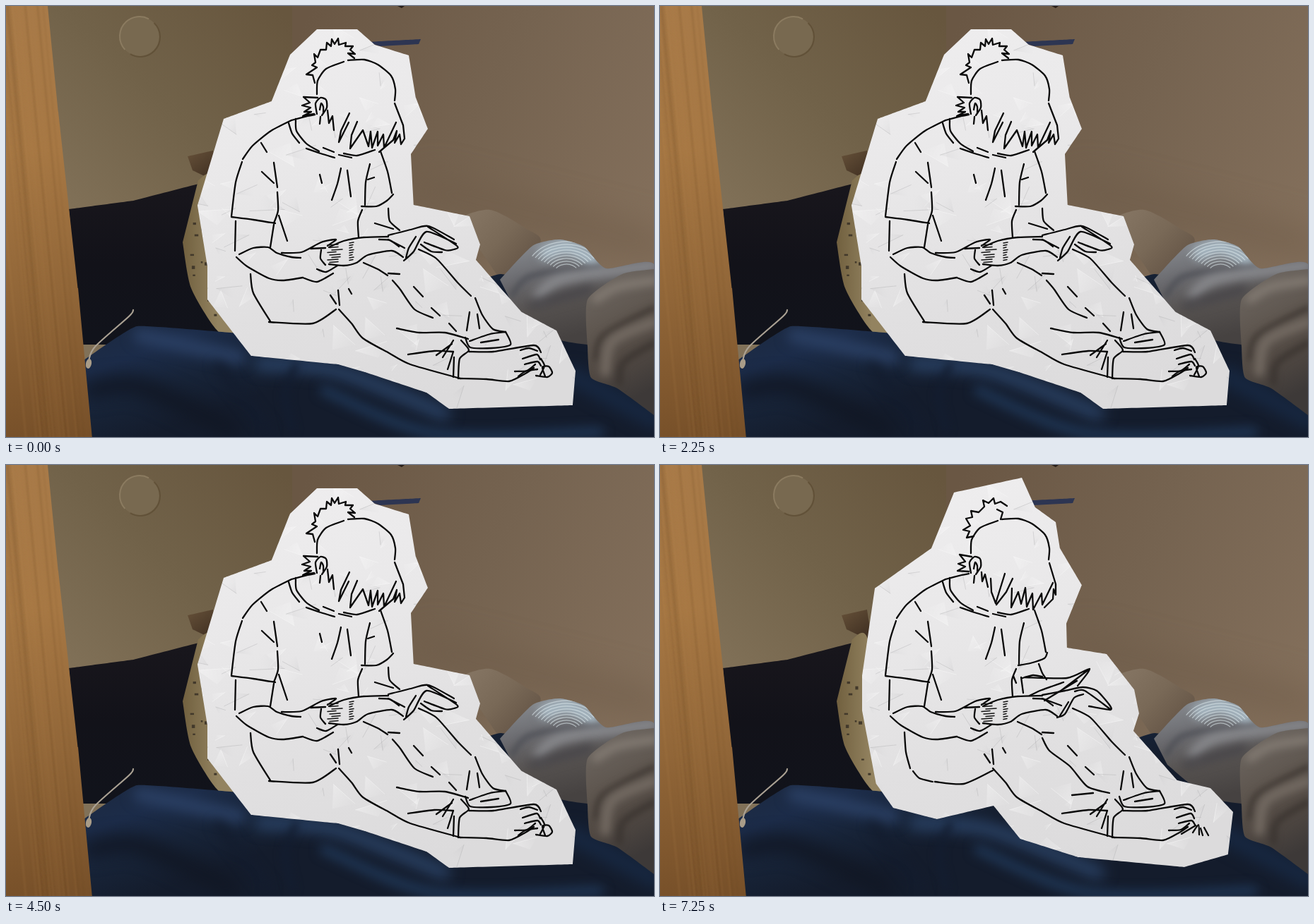
Animation, 917 px wide and 611 px high, one loop 8 s. Source, as an HTML page with a canvas:

```html
<!DOCTYPE html>
<html lang="en">
<head>
<meta charset="utf-8">
<title>Reading in bed</title>
<style>
html, body { margin: 0; width: 100%; height: 100%; overflow: hidden; background: #6f5d49; }
canvas { display: block; }
</style>
</head>
<body>
<canvas id="stage" width="917" height="611"></canvas>
<script>
const W = 917, H = 611, LOOP = 8000;
const stage = document.getElementById('stage').getContext('2d');

function layer(draw) {
  const c = document.createElement('canvas');
  c.width = W; c.height = H;
  draw(c.getContext('2d'));
  return c;
}

function random(seed) {
  return () => (seed = (seed * 16807) % 2147483647) / 2147483647;
}

// "x y x y / x y x y": strokes separated by slashes
function trace(text, round = 0, close = false) {
  const path = new Path2D();
  for (const part of text.split('/')) {
    const n = part.trim().split(/\s+/).map(Number);
    const last = n.length / 2 - 1;
    const at = i => { const k = Math.max(0, Math.min(last, i)) * 2; return [n[k], n[k + 1]]; };
    path.moveTo(n[0], n[1]);
    for (let i = 0; i < last; i++) {
      const [p, a, b, q] = [at(i - 1), at(i), at(i + 1), at(i + 2)];
      path.bezierCurveTo(
        a[0] + (b[0] - p[0]) * round, a[1] + (b[1] - p[1]) * round,
        b[0] - (q[0] - a[0]) * round, b[1] - (q[1] - a[1]) * round, b[0], b[1]);
    }
    if (close) path.closePath();
  }
  return path;
}

function blend(g, x0, y0, x1, y1, ...colors) {
  const fill = g.createLinearGradient(x0, y0, x1, y1);
  colors.forEach((c, i) => fill.addColorStop(i / (colors.length - 1), c));
  return fill;
}

function shape(g, text, fill, round = 0) {
  g.fillStyle = fill;
  g.fill(trace(text, round, true));
}

function soft(g, text, color, width, blur) {
  g.save();
  g.filter = `blur(${blur}px)`;
  g.strokeStyle = color;
  g.lineWidth = width;
  g.lineCap = 'round';
  g.stroke(trace(text, 0.15));
  g.restore();
}

function clipTo(g, text, round, draw) {
  g.save();
  g.clip(trace(text, round, true));
  draw();
  g.restore();
}

function ring(g, x, y, r, from, to, color) {
  g.strokeStyle = color;
  g.beginPath(); g.arc(x, y, r, from, to); g.stroke();
}

const room = layer(g => {
  g.fillStyle = blend(g, 380, 0, 90, 300, '#67563e', '#716249', '#817158');
  g.fillRect(0, 0, 410, H);
  g.fillStyle = blend(g, 405, 60, 917, 300, '#6a5744', '#756350', '#836f5b');
  g.fillRect(405, 0, W - 405, H);
  soft(g, '600 260 917 340', '#6b584688', 40, 24);

  // wall disc
  g.fillStyle = '#786950';
  g.beginPath(); g.arc(189, 43, 28, 0, 7); g.fill();
  g.lineWidth = 2;
  ring(g, 189, 43, 28, 2.4, 5.2, '#8b7b60');
  ring(g, 190, 44, 28, -0.8, 2.1, '#59492f99');

  shape(g, '510 51 587 47 584 54 530 57', '#2d3552');
  shape(g, '554 0 564 0 560 3', '#261c16');

  // headboard and pillows
  shape(g, '257 213 293 205 300 250 264 233', blend(g, 257, 205, 290, 250, '#665139', '#3d2d20'));
  shape(g, '89 288 180 276 300 245 350 480 107 480', blend(g, 180, 260, 180, 470, '#18161c', '#121219', '#11131b'));
  const cushion = '272 247 295 250 325 464 298 459 262 400 250 335';
  shape(g, cushion, blend(g, 250, 350, 300, 350, '#71603f', '#938360'), 0.12);
  clipTo(g, cushion, 0.12, () => {
    const r = random(31);
    g.fillStyle = '#42392b';
    for (let i = 0; i < 32; i++) g.fillRect(252 + r() * 64, 255 + r() * 205, 2 + r() * 4, 2 + r() * 3);
  });
  shape(g, '640 300 685 289 735 315 756 336 702 392', blend(g, 660, 300, 730, 370, '#837361', '#796957', '#675748'), 0.14);

  // bed
  const sheet = '106 505 185 454 330 464 480 470 700 380 917 460 917 611 110 611';
  shape(g, sheet, blend(g, 140, 450, 200, 611, '#1c2940', '#1c2c49', '#172337', '#141c2c'), 0.05);
  clipTo(g, sheet, 0.05, () => {
    soft(g, '190 467 250 480 330 498', '#2b4064', 20, 9);
    soft(g, '360 507 470 518 620 578', '#2b4468', 18, 10);
    soft(g, '410 510 395 550 405 600', '#131d30', 9, 6);
    soft(g, '300 510 370 600', '#131c2e', 12, 8);
    soft(g, '450 545 610 607 840 604', '#213a5b', 12, 8);
    soft(g, '120 545 190 540 320 600', '#111724', 25, 12);
    soft(g, '804 525 917 586', '#172740', 28, 10);
  });

  // blanket
  const quilt = '699 388 745 340 783 331 818 341 849 372 917 366 917 480 785 474 718 425';
  shape(g, quilt, blend(g, 760, 335, 790, 470, '#83868b', '#6a6a6e', '#55514f', '#464241'), 0.1);
  clipTo(g, quilt, 0.1, () => {
    soft(g, '764 350 795 341 832 361', '#a9bac5', 20, 7);
    soft(g, '716 410 745 382 840 371', '#494b52', 6, 4);
    soft(g, '754 410 790 386 917 368', '#8b8c90', 15, 7);
    soft(g, '745 424 825 402', '#454347', 12, 7);
    g.lineWidth = 1.3;
    g.strokeStyle = '#dce8ec99';
    for (let i = 0; i < 9; i++) {
      g.beginPath();
      g.ellipse(793, 378, 17 + i * 5, 12 + i * 4, 0, 3.7, 5.7);
      g.stroke();
    }
  });
  const fold = '917 373 872 380 823 416 823 483 828 527 865 542 917 580';
  shape(g, fold, blend(g, 825, 400, 900, 550, '#6c655f', '#5f5750', '#514943', '#3d3938'), 0.1);
  clipTo(g, fold, 0.1, () => {
    soft(g, '835 415 865 398 917 389', '#827a72', 12, 6);
    soft(g, '835 500 846 467 917 428', '#3f3833', 7, 4);
    soft(g, '848 519 858 475 917 448', '#746b63', 13, 6);
    soft(g, '868 535 874 505 917 478', '#39332f', 8, 5);
  });

  // door and cable
  const door = '0 0 59 0 74 150 102 400 122 611 0 611';
  shape(g, door, blend(g, 20, 0, 70, 611, '#a87a48', '#a77844', '#916638', '#775029'));
  clipTo(g, door, 0, () => {
    const r = random(5);
    for (let i = 0; i < 28; i++) {
      const x = r() * 90 - 30;
      soft(g, `${x} 0 ${x + 58} 611`, r() > 0.5 ? '#b9874f20' : '#63422320', 1 + r() * 3, 1);
    }
  });
  soft(g, '117 503 126 483 174 440 180 431', '#aaa193', 2.2, 0.4);
  g.fillStyle = '#a99c88';
  g.beginPath(); g.ellipse(117, 507, 4, 7, 0.2, 0, 7); g.fill();
});

const paper = layer(g => {
  g.fillStyle = blend(g, 410, 30, 560, 571, '#eeedee', '#e9e8e9', '#e1e0e1', '#dcdbdc');
  g.fillRect(0, 0, W, H);
  const r = random(77);
  for (let i = 0; i < 230; i++) {
    const x = 250 + r() * 570, y = 10 + r() * 570, a = r() * 6.28, d = 12 + r() * 38;
    const px = x + Math.cos(a) * d, py = y + Math.sin(a) * d * 0.7;
    const qx = x + Math.cos(a + 0.7) * d * 0.7, qy = y + Math.sin(a + 0.7) * d * 0.7;
    const dark = r() < 0.45;
    g.fillStyle = blend(g, x, y, px, py, dark ? '#99999d22' : '#ffffff55', '#ffffff00');
    g.fill(trace(`${x} ${y} ${px} ${py} ${qx} ${qy}`, 0, true));
    soft(g, `${x} ${y} ${px} ${py}`, dark ? '#aaaaad60' : '#f9f9f980', 1, 0.7);
  }
});

const cutA = '440 33 497 33 522 55 570 70 580 130 597 174 573 210 577 282 656 298 671 338 665 360 730 434 779 460 806 517 802 566 627 571 595 548 508 519 470 508 347 496 285 416 285 368 271 283 308 160 376 135 402 69';
const cutB = '488 26 522 52 578 80 594 163 574 213 579 280 660 295 677 352 677 376 718 425 781 461 799 488 804 546 768 555 660 560 556 534 470 479 355 502 316 452 298 392 273 358 288 242 321 157 371 124 410 60';
const cutD = '416 39 512 18 531 60 560 81 566 118 597 170 575 225 576 259 632 268 671 318 678 352 670 377 732 447 779 458 811 492 804 552 742 570 592 556 510 530 472 483 392 502 330 486 306 452 286 348 286 300 304 175 384 118';
const widen = (text, left, grow) =>
  text.split(' ').map((v, i) => i % 2 ? v : left + (v - 286) * grow).join(' ');
const cutC = widen(cutD, 268, 1.03);

// parts common to both drawings
const shirt = `404 162 375 177 349 198 335 217 / 334 221 325 250 319 298 / 319 299 350 303 381 308
/ 379 222 384 257 / 384 264 385 290 379 308 / 386 297 398 333 / 362 235 379 251 / 361 194 369 207
/ 474 230 469 252 461 275 / 483 233 488 270 / 515 224 509 250 508 282 / 530 206 540 235 546 265
/ 504 289 498 305 499 328`;
const collar = `404 162 427 156 437 154 / 410 160 411 177 425 195 443 206 / 400 166 405 181 415 194
/ 425 202 445 209 465 215 / 449 201 464 207 / 471 211 489 215 / 478 209 497 212 522 204`;
const arm = `325 305 324 347 / 330 352 350 343 371 342 383 350 404 356 417 357
/ 326 356 341 369 372 386 392 389 420 385 / 379 310 374 342
/ 390 350 418 349 446 335 467 331 455 340 / 431 344 452 343
/ 420 385 440 391 463 379 / 440 373 453 377 469 368 / 446 346 445 358 452 367`;
const leftPage = `457 342 478 333 506 328 541 327 / 457 366 478 368 496 364 512 353 546 347 562 356
/ 528 331 543 332 556 341`;
const legs = `471 430 489 450 505 471 542 492 572 508 643 528 / 470 403 472 424 / 459 410 467 422
/ 485 401 489 408 / 506 364 526 373 540 382 / 541 379 557 380 / 584 345 609 358 639 392 658 411
/ 664 414 674 438 689 458 707 462 / 577 398 590 412 / 602 428 614 439 / 656 434 652 460 / 667 437 670 457`;
const cuffs = `569 494 606 489 633 490 / 633 474 618 498 / 609 495 631 479 / 633 490 625 515
/ 644 474 655 488 642 500 640 528 / 634 498 633 526 / 650 470 657 484 687 485 714 480 707 462
/ 656 475 685 465 707 462 / 672 477 697 473`;
const foot = `655 490 690 490 747 481 757 491 / 642 528 680 529 712 532 735 521 747 513
/ 728 488 740 485 752 489 / 731 500 751 494 756 501 / 734 508 752 504 757 510 / 720 518 737 517 749 508`;
const crown = `440 125 441 106 453 89 478 79 / 484 77 507 76 526 83 545 99 551 118 550 134
/ 440 153 438 138 445 130 453 133 454 144 447 155 / 444 147 446 138 449 143 449 152 / 445 157 444 167`;

// angular drawing
const bunA = `437 109 434 98 425 97 434 91 440 87 433 84 438 80 436 68 441 73 445 62 453 62 454 52 460 57 461 47
465 54 470 46 471 55 481 52 480 57 491 57 487 62 494 68 484 67 493 74`;
const fringeA = `441 130 421 129 430 137 419 141 431 144 422 150 432 150 420 156 436 153
/ 455 148 457 166 462 156 464 176 / 486 152 474 177 471 193 485 165
/ 497 164 489 183 487 202 505 176 513 199 516 178 518 201 526 178 526 198 534 182 535 201 552 165
/ 528 207 548 190 553 177 550 194 557 182 559 196 564 188 562 169 550 138`;
const bookA = `541 325 573 317 598 312 634 331 / 541 331 564 343 / 563 361 577 348 595 320 637 337
/ 566 357 570 343 580 327 / 597 313 638 340 634 345 621 346 592 335 / 587 338 602 348 617 349`;
const sleeveA = '548 267 539 276 524 284 503 284 / 512 246 521 243 / 444 239 447 251 / 541 287 543 305 557 318 / 522 308 548 316';
const seatA = `346 380 350 407 374 447 / 372 448 434 450 467 430 / 547 389 558 402 578 430 604 442
/ 627 450 637 461 / 553 457 585 463 621 463 654 472`;
const toesA = '725 525 735 518 752 515 / 750 524 766 526 773 520 768 511 759 512 763 525 / 757 500 762 510 756 523';

// rounder drawing
const bunB = `444 101 434 103 438 94 429 92 439 86 433 76 442 74 440 65 451 67 459 59 457 50 465 54 472 47 474 55 482 52 491 58
/ 477 63 485 67 482 77`;
const fringeB = `441 130 424 127 432 137 422 140 432 144 421 150 437 151 / 455 152 456 165 460 155 464 173
/ 468 161 469 180 475 196 488 154 / 499 161 490 180 476 198
/ 498 175 497 202 507 180 511 197 517 174 519 201 527 182 528 205 540 182 541 198 556 167
/ 544 202 556 190 557 176 560 184 560 169 551 139`;
const bookB = `541 326 573 320 598 315 618 320 636 340 637 347 607 342 / 541 331 568 341
/ 562 358 573 353 586 330 599 325 / 565 357 578 336 / 587 321 601 320 637 346`;
const sleeveB = '548 266 544 274 524 281 507 284 / 500 299 504 309';
const forearm = '536 281 541 300 560 320 / 511 308 530 308 551 319';
const seatB = `346 379 348 407 354 430 / 358 434 367 444 386 449 / 389 449 430 452 471 433
/ 541 387 551 405 580 427 605 456 636 465 / 583 468 613 465`;
const toesB = '738 523 758 511 / 754 521 762 510 763 524 / 765 515 768 525 / 770 514 776 525';

const bunLow = `447 98 449 91 444 82 453 83 449 73 460 74 461 68 471 72 473 64 480 69 486 64 490 71 500 70 497 77 504 83
/ 432 124 429 139 433 137 424 151 431 149 428 155 437 157`;
const fringeLow = `448 153 452 171 456 157 459 173 466 160 471 189 487 167 477 195
/ 491 166 488 185 494 174 496 188 504 174 503 196 513 178 509 202 526 172 520 195 531 183 530 202
544 171 538 193 546 180 548 194 552 172 552 155 546 146`;
const crownLow = `432 124 440 107 456 93 477 86 / 484 84 505 84 523 90 537 101 / 541 107 546 125 546 144
/ 439 156 438 139 445 127 452 134 443 158 / 444 139 447 146 442 154`;
const hand = `510 305 526 298 536 287 550 285 568 299 569 309 560 318 545 319 541 314 / 528 299 540 289 557 290
/ 529 305 541 296 561 299 / 533 313 543 304 565 307 / 529 303 517 310 516 319 530 320 538 316`;
const leaf = `511 301 514 323 / 513 302 528 298 541 300 / 536 282 541 295 547 304 / 516 301 576 302 608 289 591 313
/ 608 289 566 321 / 523 327 540 319 571 308 / 544 334 590 306`;

function lines(g, text, round) {
  g.strokeStyle = '#090909';
  g.lineWidth = 2.3;
  g.lineCap = g.lineJoin = 'round';
  g.stroke(trace(text, round));
}

function textRows(g) {
  g.strokeStyle = '#151515';
  g.lineWidth = 1.5;
  for (let i = 0; i < 8; i++) {
    const y = 339 + i * 3.5, x = 455 + (i % 3) * 3;
    g.beginPath();
    g.moveTo(x, y); g.lineTo(x + 15 - i % 2 * 3, y - 1);
    g.moveTo(486, y - 3); g.lineTo(492 - i % 3, y - 4);
    g.stroke();
  }
}

const common = [shirt, collar, arm, leftPage, legs, cuffs, foot];
const angular = [crown, sleeveA, bookA, seatA, toesA];
const rounded = [sleeveB, bookB, seatB, toesB];

function pose(cut, hair, curves) {
  return layer(g => {
    g.drawImage(room, 0, 0);
    clipTo(g, cut, 0, () => g.drawImage(paper, 0, 0));
    for (const part of hair) lines(g, part, 0);
    for (const part of [...common, ...curves]) lines(g, part, 0.12);
    textRows(g);
  });
}

const hairB = [bunB, fringeB];
const calm = [crown, forearm, ...rounded];
const sketch = pose(cutA, [bunA, fringeA], angular);
const still = pose(cutB, hairB, calm);
const wide = pose(cutC, hairB, calm);
const tall = pose(cutD, hairB, calm);
const reach = pose(cutB, [bunLow, fringeLow], [crownLow, hand, ...rounded]);
const turn = pose(cutD, hairB, [crown, leaf, ...rounded]);

const cycle = [sketch, still, wide];
function poseAt(t) {
  if (t < 5250) return cycle[Math.floor(t / 750) % 3];
  if (t < 5750) return tall;
  if (t < 6500) return reach;
  return t < 7250 ? sketch : turn;
}

function frame() {
  stage.drawImage(poseAt(performance.now() % LOOP), 0, 0);
  requestAnimationFrame(frame);
}
frame();
</script>
</body>
</html>
```
